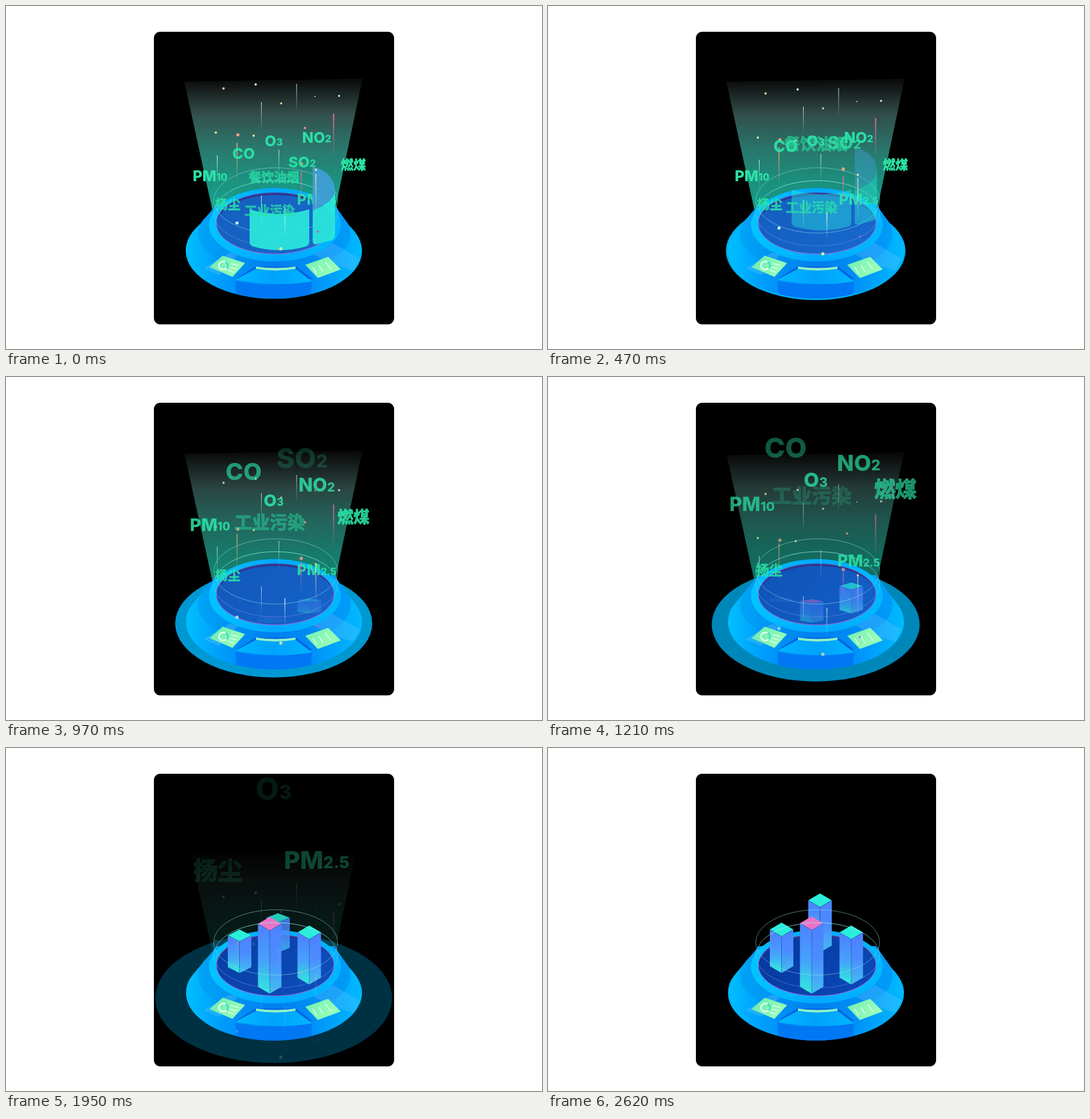
These frames come from a looping animation (935x599 px, 2650 ms). An HTML page with a canvas:

```html
<!DOCTYPE html>
<html lang="zh">
<head>
<meta charset="utf-8">
<style>
html, body { margin: 0; width: 100%; height: 100%; overflow: hidden; background: #fff; }
canvas { display: block; }
</style>
</head>
<body>
<canvas id="stage" width="935" height="599"></canvas>
<script>
const ctx = document.getElementById('stage').getContext('2d');
const LOOP = 2650;
const clamp = v => Math.min(1, Math.max(0, v));
const smooth = u => u * u * (3 - 2 * u);
const span = (t, start, length) => clamp((t - start) / length);

// label, subscript, x, y, start, duration, rise, growth, opacity, drift
const labels = [
  ['PM', '2.5', 542, 337, 965, 1290, 165, .76, .88, 0],
  ['扬尘', '', 387, 346, 1058, 990, 136, .98, .8, -18],
  ['工业污染', '', 460, 357, 353, 1055, 165, .63, .68, 0],
  ['餐饮油烟', '', 467.5, 299, 52, 900, 130, .58, .7, 0],
  ['SO', '2', 516.5, 272, 165, 960, 140, .92, .92, 0],
  ['CO', '', 414.5, 257, 250, 1350, 168, 1.09, .95, 0],
  ['O', '3', 467, 235, 665, 1420, 168, 1.02, .95, 0],
  ['NO', '2', 542, 229, 495, 1450, 161, 1, .95, 0],
  ['PM', '10', 356, 296, 495, 1450, 151, .62, 1, 0],
  ['燃煤', '', 606, 277, 660, 955, 132, 1.11, 1, 0]
];
// centre x, foot y, height, start, top colour
const bars = [
  [474.5, 357, 103, 1170, '#2aeedb'],
  [407.5, 393, 88, 973, '#2aeedb'],
  [460, 429, 135, 744, '#ea74c8'],
  [529, 413, 103, 550, '#2aeedb']
];
const YELLOW = '#eee29a', WHITE = '#e2fbf4', ORANGE = '#f5a080', PINK = '#f06aa4';
const dots = [
  [379.5, 144, 2, YELLOW], [435.5, 137, 2, WHITE], [480, 170, 1.8, YELLOW], [539, 158, 1, WHITE],
  [581, 157, 1.8, WHITE], [366, 221, 2, YELLOW], [404.5, 225, 2.8, ORANGE], [432, 226.5, 2, YELLOW],
  [521.5, 213, 2, ORANGE], [515, 276, 3, ORANGE], [540.5, 286, 2, YELLOW], [403, 379, 2.8, '#c5ecff'],
  [544, 394, 2, '#c553c8'], [479.5, 424, 2.8, '#ddeaa8']
];
const streaks = [
  [445.5, 168, 50, 1, WHITE], [507, 136, 50, 1, WHITE], [571.5, 188, 75, 2, PINK],
  [403, 239, 72, 1.6, '#f2b27c'], [368.5, 261, 50, 1, WHITE], [476, 251, 50, 1, WHITE],
  [515, 289, 54, 1.6, PINK], [540.5, 293, 74, 1.6, YELLOW], [445.5, 331, 50, 1, WHITE],
  [486.5, 351, 50, 1.6, WHITE]
];

function gradient(x0, y0, x1, y1, ...colours) {
  const g = ctx.createLinearGradient(x0, y0, x1, y1);
  colours.forEach((c, i) => g.addColorStop(i / (colours.length - 1), c));
  return g;
}
function poly(fill, ...p) {
  ctx.beginPath();
  for (let i = 0; i < p.length; i += 2) ctx.lineTo(p[i], p[i + 1]);
  ctx.closePath();
  ctx.fillStyle = fill;
  ctx.fill();
}
function ellipse(x, y, rx, ry, fill, stroke, width = 1) {
  ctx.beginPath();
  ctx.ellipse(x, y, rx, ry, 0, 0, 7);
  if (fill) { ctx.fillStyle = fill; ctx.fill(); }
  if (stroke) { ctx.strokeStyle = stroke; ctx.lineWidth = width; ctx.stroke(); }
}
function shape(d, fill) {
  ctx.fillStyle = fill;
  ctx.fill(new Path2D(d));
}
function lines(d, colour, width) {
  ctx.strokeStyle = colour;
  ctx.lineWidth = width;
  ctx.stroke(new Path2D(d));
}

function drawBeam(t, fade) {
  const drop = 54 * Math.exp((t - 1950) * .0034), inset = drop * .215;
  const top = 130 + drop;
  ctx.globalAlpha = fade;
  if (top < 370) poly(
    gradient(0, top, 0, 372, '#0c0c0c', '#33514d', '#2a7a6f', '#1a9582', '#13a48f'),
    311 + inset, top + 2, 622 - inset, top - 3, 571, 370, 363, 370);
  ctx.globalAlpha = 1;
}

function drawRipple(t) {
  const grow = smooth(span(t, 170, 2100)), rx = 153.5 + 56.5 * grow;
  ctx.globalAlpha = 1 - span(t, 150, 2110) ** 2;
  ellipse(467, 427 + 10.5 * grow, rx, rx * .549, '#00b4f8');
  ctx.globalAlpha = 1;
}

function drawBase(fade) {
  shape('M314 428Q314 410 325 397L368 346H572L599 384Q621 406 621 428A153.5 83 0 0 1 314 428Z',
    gradient(314, 0, 621, 0, '#00c0ff', '#00a2fc', '#008cf7', '#007ef3', '#0088f7', '#00a2fc', '#00bbff'));
  ellipse(468, 398, 133, 67, gradient(335, 0, 601, 0, '#00a4f6', '#007ff0', '#009cf8'));
  shape('M400 480Q467 494 534 480L532 503Q467 519 402 503Z', '#0078f3');
  // light sheens
  poly('rgba(120,200,255,.28)', 390, 431, 406, 433, 372, 470, 345, 458);
  poly('rgba(120,200,255,.25)', 535, 433, 570, 414, 617, 441, 606, 462, 570, 452);
  // front console
  poly('#0063e0', 435, 455, 506, 455, 535, 477, 400, 477);
  shape('M436 459Q470 465 505 459L534 481Q467 492 400 478Z',
    gradient(400, 0, 534, 0, '#00b8ff', '#00a2fc', '#00b4ff'));
  shape('M436 455Q470 460 505 455V459Q470 465 436 459Z', '#8df5c8');
  // side screens
  poly(gradient(365, 440, 405, 470, '#6eeeb0', '#9bffb8'), 378, 436, 417, 449, 395, 473, 355, 456);
  poly(gradient(530, 445, 575, 470, '#7af2b4', '#9bffb8'), 522, 452, 562, 438, 584, 460, 544, 475);
  lines('M385 458A8 7 0 1 1 383 447', '#f2fff8', 2.4);
  lines('M383 447A8 7 0 0 1 385 458', '#37d9d4', 2.4);
  lines('M392 450L405 453M390 456L402 459M387 461L398 465', '#e8fff2', 1.6);
  lines('M535 456L542 467M546 453L553 464M557 447L567 460', '#e8fff2', 1.4);
  // collar and pit
  ellipse(469, 382, 115, 64, gradient(354, 0, 584, 0, '#00c4ff', '#00a8ff', '#00b8ff'));
  ellipse(469.5, 379.5, 102.5, 53.5, '#2f3590');
  ctx.save();
  ctx.clip();
  ellipse(470, 383, 103, 53, gradient(400, 330, 520, 430, '#06389f', '#0a46b5'));
  ctx.globalAlpha = fade * .5;
  ellipse(470, 383, 103, 53, '#2488e2');
  ctx.restore();
  ellipse(469.5, 379.5, 102.5, 53.5, null, gradient(0, 326, 0, 433, '#4a50b0', '#b04fcc', '#b86ad8'));
}

function drawBar(t, [x, foot, height, start, top]) {
  const p = smooth(span(t, start, 1275));
  if (!p) return;
  ctx.save();
  ctx.globalAlpha = Math.min(1, p * 1.25);
  ctx.translate(x, foot);
  ctx.scale(1, p);
  const w = 20.5, h = height;
  poly(gradient(0, 24 - h, 0, 0, '#4c86ff', '#46a4fa', '#2df0dc'), -w, 12 - h, 0, 24 - h, 0, 0, -w, -12);
  poly(gradient(0, 12 - h, 0, 0, '#4c82ff', '#4c8cff', '#40c0ee'), 0, 24 - h, w, 12 - h, w, -12, 0, 0);
  poly(top, 0, -h, w, 12 - h, 0, 24 - h, -w, 12 - h);
  lines(`M${-w} ${12 - h}L0 ${24 - h}L${w} ${12 - h}M0 ${24 - h}V0`, 'rgba(20,60,150,.65)', .8);
  ctx.restore();
}

function drawPanels(t) {
  ctx.save();
  ctx.globalAlpha = .93 * (1 - span(t, 0, 850));
  ctx.translate(0, -59 * (t / 660) ** 1.6);
  shape('M425 355Q477 371 529 355V412Q529 418 523 420Q477 433 431 420Q425 418 425 412Z', '#2ae8dc');
  shape('M535 281Q572 290 574 322Q573 342 535 357Z', '#409fd8');
  shape('M574 322V400Q574 406 568 409L541 416Q535 417 535 411V357Q573 342 574 322Z', '#2ae8dc');
  ctx.restore();
}

function drawParticles(t, fade) {
  const move = smooth(span(t, 100, 2350));
  ctx.globalAlpha = fade;
  for (const [x, y, length, width, colour] of streaks) {
    const top = y + 113 * move;
    ctx.fillStyle = gradient(0, top, 0, top + length, colour, colour + '00');
    ctx.fillRect(x - width / 2, top, width, length);
  }
  for (const [x, y, r, colour] of dots) ellipse(x, y + 131 * move, r, r, colour);
  ctx.globalAlpha = 1;
}

function drawLabel(t, [text, sub, x, y, start, length, rise, growth, opacity, drift]) {
  const u = span(t, start, length), p = smooth(u), scale = 1 + growth * p;
  const latin = /[A-Z]/.test(text);
  const mainFont = latin ? '800 26px Inter, sans-serif'
    : '900 22px "Noto Sans CJK SC", "Noto Sans CJK", sans-serif';
  const subFont = '800 17px Inter, sans-serif';
  ctx.save();
  ctx.globalAlpha = opacity * (1 - u * u) ** 1.25;
  ctx.fillStyle = ctx.strokeStyle = '#2ae3a6';
  ctx.translate(x + drift * p, y - rise * p);
  ctx.scale(scale, scale);
  ctx.font = subFont;
  const subWidth = ctx.measureText(sub).width;
  ctx.font = mainFont;
  const width = ctx.measureText(text).width, left = -(width + subWidth) / 2;
  const baseline = latin ? 9.5 : 8.4;
  ctx.fillText(text, left, baseline);
  if (!latin) {
    ctx.lineWidth = .8;
    ctx.strokeText(text, left, baseline);
  }
  ctx.font = subFont;
  ctx.fillText(sub, left + width, 9);
  ctx.restore();
}

function draw(t) {
  const fade = 1 - span(t, 150, 1990) ** 2;
  ctx.clearRect(0, 0, 935, 599);
  ctx.beginPath();
  ctx.roundRect(258, 45, 419, 511, 11);
  ctx.fillStyle = '#000';
  ctx.fill();
  drawBeam(t, fade);
  drawRipple(t);
  drawBase(fade);
  bars.forEach(bar => drawBar(t, bar));
  ellipse(470.5, 339.5, 108, 57, null, 'rgba(150,230,232,.55)');
  ellipse(470.5, 362, 108, 57, null, gradient(0, 305, 0, 419, 'rgba(150,240,235,.8)', 'rgba(130,140,235,.5)'));
  drawLabel(t, labels[0]);
  drawPanels(t);
  drawParticles(t, fade);
  labels.slice(1).forEach(label => drawLabel(t, label));
}

function frame() {
  draw(performance.now() % LOOP);
  requestAnimationFrame(frame);
}
frame();
</script>
</body>
</html>
```
